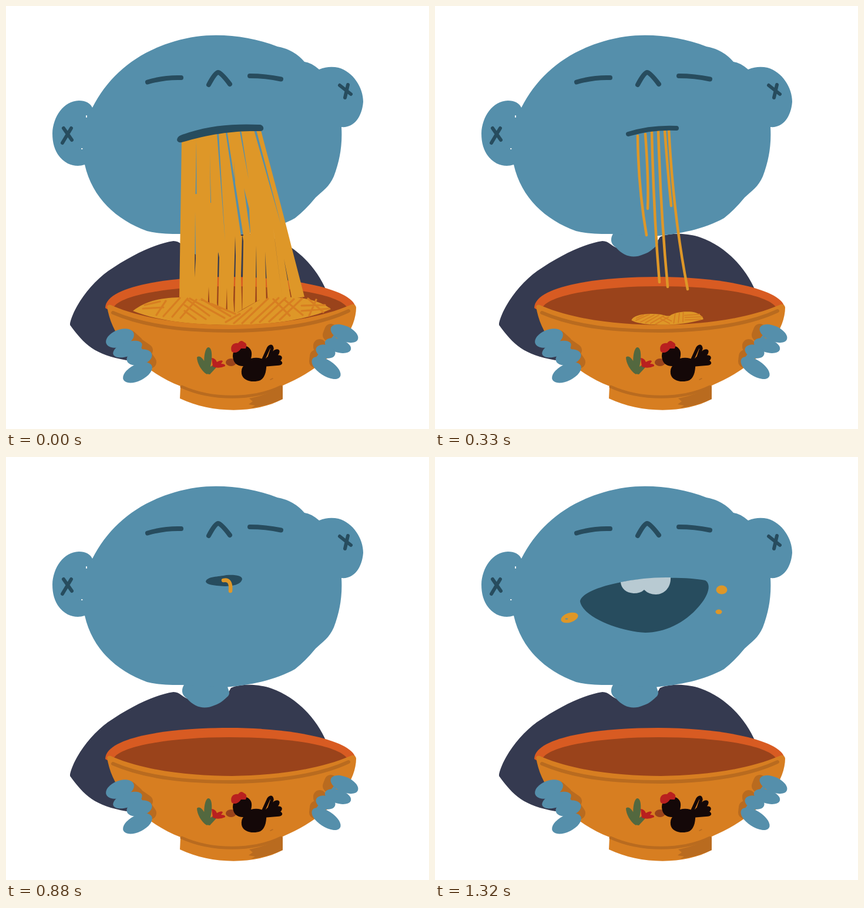
An HTML page without scripts that plays this animation: 720 by 720 pixels, repeating every 1430 ms.

```html
<!DOCTYPE html>
<html lang="en">
<head>
<meta charset="utf-8">
<title>Noodle slurp</title>
<style>
  html, body { margin: 0; width: 100%; height: 100%; overflow: hidden; background: #fff; }
  svg { display: block; width: 100%; height: 100%; }
  path { stroke-linecap: round; stroke-linejoin: round; }
  .skin { fill: #558fab; }
  .ink { fill: #274c5e; }
  .line { fill: none; stroke: #274c5e; }
  .noodle { fill: #de9728; }
  .strand { fill: none; stroke: #de9728; stroke-width: 4.5; }
  .thick { stroke-width: 6.5; }
  .crease { fill: none; stroke: #d77e21; stroke-width: 3.2; }
  .bowl { fill: #d77e21; }
  .shade { fill: #b96b1f; }
  .band { fill: none; stroke: #b96b1f; }
  .hen { fill: #140808; }
  .feather { fill: none; stroke: #140808; stroke-width: 5.5; }
  .red { fill: #b9201f; }
  /* each pose owns one 110 ms slot of the 13-slot loop */
  .pose { visibility: hidden; animation: show 1430ms step-end infinite; animation-delay: calc(var(--i) * 110ms - 1430ms); }
  @keyframes show {
    0% { visibility: visible; }
    7.6923% { visibility: hidden; }
    100% { visibility: hidden; }
  }
</style>
</head>
<body>
<svg viewBox="0 0 720 720">
  <defs>
    <mask id="gaps" maskUnits="userSpaceOnUse" x="0" y="0" width="720" height="720">
      <path fill="#fff" d="M0 0H720V720H0Z"/>
      <path d="M324 228L324.500 320H322.500ZM322 350L323 430 321 462ZM347 250L349 335H348ZM359 216L362 216 368 320 373 400ZM374 215L376.500 215 404 391H400ZM398 214L400.500 214 413 295ZM422 211L426 211 441 268 468 372ZM405 310L414 345 416 390ZM388 262L390 300H389Z"/>
      <path d="M361 418L363 428 361 520 359 505ZM376 480L377 530H374ZM390 392L391 425 389 530 387 500ZM402 388L404 400 402 530 400 460ZM426 408L427 515H424ZM441 418L446 510H443ZM455 378L459 410 472 510ZM345 478L347 520H343ZM473 430L488 505H486Z"/>
    </mask>

    <path id="mouthWide" class="ink" d="M291 228C292 219 302 219 312 215C350 203 390 200 433 202C440 204 440 213 433 213C390 212 350 217 299 232Q292 233 291 228Z"/>
    <path id="mouthLine" class="line" stroke-width="8" d="M308 222Q366 205 424 208"/>
    <path id="mouthOval" class="ink" d="M340 212C342 203 362 204 375 201C391 200 402 202 402 208C400 217 386 220 372 220C352 219 341 217 340 212Z"/>
    <path id="mouthSmall" class="ink" d="M354 210Q370 196 386 210Q370 224 354 210Z"/>
    <g id="laugh">
      <path class="ink" d="M247 246C247 236 270 222 317 213C360 204 430 204 460 210C470 216 466 232 455 247C430 281 392 299 358 299C315 297 252 273 247 246Z"/>
      <path fill="#b8cad2" d="M316 213Q360 204 401 205C402 222 390 234 376 234Q364 234 356 226Q350 232 338 232C325 231 317 224 316 213Z"/>
    </g>
    <g id="crumbs" class="noodle">
      <ellipse cx="229" cy="273.500" rx="15" ry="8" transform="rotate(-17 229 273.500)"/>
      <ellipse class="skin" cx="224" cy="275.500" rx="2.500" ry="1"/>
      <ellipse cx="488" cy="226" rx="9.500" ry="7.500"/>
      <ellipse cx="483" cy="263.500" rx="5.500" ry="4"/>
    </g>
    <g id="smallPile">
      <path class="noodle" d="M294 530C298 516 330 510 360 512C380 511 394 520 403 517C415 508 440 504 465 506C485 509 497 519 498 527C460 538 420 543 385 543C350 543 310 540 294 530Z"/>
      <path class="crease" d="M308 524L328 515M307 530L345 513M320 535L358 515M334 537L372 515M348 539L386 517M362 541L399 521M382 519L407 532M377 526L402 539M418 511L414 538M430 509L427 536M441 508L440 534M445 516L487 513M446 522L494 520M446 529L490 527"/>
    </g>
  </defs>

  <path fill="#353a50" d="M109 540C115 513 142 474 174 451C212 425 252 405 285 400C297 400 300 410 312 412L372 412L383 393C402 385 432 387 452 394C497 410 530 448 545 484L400 570L205 603C150 593 134 577 109 543Z"/>
  <path class="skin" d="M304 386C298 395 298 405 308 411C322 427 338 430 354 423C367 419 373 411 378 407C383 400 377 396 377 389Z"/>
  <path class="skin" d="M147 173C180 108 240 65 324 52C370 46 420 53 462 69Q490 74 508 95Q519 96 533 108C545 103 556 103 566 105C591 112 608 139 608 163C606 190 591 208 571 206C573 240 567 266 558 290C550 308 540 314 527 326Q510 347 492 361C458 380 417 388 372 392L303 388C280 388 260 388 240 383C188 364 147 327 134 270Q120 275 105 268C87 258 79 240 79 217C80 188 98 162 124 161Q141 161 147 173Z"/>
  <path fill="none" stroke="#fff" stroke-width="2" d="M137 187v2M129 243h.5"/>
  <path class="line" stroke-width="8" d="M241 129.500Q270 121 298 122M415 119Q442 119 468 124.500M345 134Q356 113 361 113Q366 113 381 133"/>
  <path class="line" stroke-width="6" d="M98 208L112 228M111 208L96 233M568 135L587 150M582 134L577 156"/>

  <path fill="#d85b22" d="M169 514C169 478 270 461 380 461C490 461 593 483 595 514L560 540H210Z"/>
  <path fill="#9a431b" d="M183 513C195 492 280 477 380 477C480 477 562 490 580 512L540 540L385 550L230 540Z"/>

  <g class="pose" style="--i:0">
    <path class="noodle" mask="url(#gaps)" d="M299 227Q366 203 433 208C449 270 470 345 486 410L508 495L470 501 432 500 405 515 392 523 360 512 340 502 295 496Z"/>
    <path class="noodle" d="M216 519C240 500 270 496 300 496C330 498 350 506 364 515L394 522L432 500C470 492 525 493 553 516C500 539 430 543 385 543C320 543 260 537 216 519Z"/>
    <path class="crease" d="M233 515L268 513M236 509L262 503M256 526L272 502M268 528L296 497M283 529L309 498M297 531L324 500M309 500L346 527M304 509L340 533M304 519L323 533M313 498L372 531M333 499L382 528M350 507L390 524M374 538L398 524M388 540L418 514M402 540L446 498M417 540L464 497M432 538L476 497M448 537L490 499M466 534L504 498M455 499L483 527M474 500L505 526M514 498L540 521M503 510L543 509M503 519L550 515M516 527L528 500"/>
    <use href="#mouthWide"/>
  </g>

  <g class="pose" style="--i:1">
    <path class="noodle" mask="url(#gaps)" d="M299 227Q366 203 433 208C449 270 470 345 486 410L492 432 480 426 470 446 457 428 444 450 430 430 415 455 400 435 389 456 376 436 366 452 358 430 350 462 334 440 321 450 310 455 293 452Z"/>
    <path class="strand thick" d="M297 420Q295 465 281 498M306 420Q304 465 292 497M317 420Q315 460 303 498M330 420Q328 465 315 501M338 420Q336 460 328 503M346 420L341 505M354 420L357 505M371 420L363 506M377 420L376 510M385 420L386 512M394 420L396 512M401 420L407 510M411 420L419 510M420 420L431 510M430 420L443 510M440 420L455 510M450 420L468 510M460 420L481 512M470 420L495 514M480 420L508 516M487 415L519 523"/>
    <path class="noodle" d="M295 420L322 415 319 448 305 455 293 452ZM327 415L360 415 359 448 345 462 329 450Z"/>
    <path class="noodle" d="M235 521C240 506 280 495 310 497C340 499 352 506 366 512C390 502 430 500 470 507C500 511 523 517 521 527C480 540 430 543 385 543C330 543 255 537 235 521Z"/>
    <path class="crease" d="M254 527Q268 505 296 500M267 530Q282 508 310 502M283 532Q296 511 322 505M299 533Q312 514 336 508M315 537Q326 519 348 511M332 538Q340 522 358 514M302 501Q338 507 355 538M325 501Q357 512 370 540M370 514Q389 520 398 540M384 510Q404 518 412 538M400 508Q419 515 428 537M388 539Q405 514 436 508M417 537Q432 514 462 509M433 536Q449 517 480 512M450 533Q468 518 498 517M440 510Q460 528 484 531M465 511Q484 524 514 525"/>
    <use href="#mouthWide"/>
  </g>

  <g class="pose" style="--i:2">
    <use href="#smallPile"/>
    <path class="strand" d="M322 228Q330 340 345 495M329 228Q333 270 339 278M323 232Q333 340 343 455M340 230Q340 370 363 509M348 224L348 336Q352 400 357 490M348 254Q357 410 357 490M356 220Q363 350 376 498M370 214Q366 280 371 313M369 226Q374 380 379 470M378 211L379 472M386 211Q388 370 396 478M398 212Q402 350 410 468M410 212Q424 280 429 299M402 228Q412 300 422 327M407 282Q423 400 435 490M410 212Q430 380 453 492"/>
    <use href="#mouthLine"/>
  </g>

  <g class="pose" style="--i:3">
    <use href="#smallPile" transform="translate(158 217) scale(.6)"/>
    <path class="strand" d="M345 221Q346 310 360 390M358 218Q364 300 362 345M369 213Q372 350 382 470M380 211Q384 350 396 478M391 211Q396 280 402 340M398 211Q406 360 430 482"/>
    <path class="line" stroke-width="8" d="M329 218Q368 206 411 208"/>
  </g>

  <g class="pose" style="--i:4">
    <use href="#mouthOval"/>
    <path class="strand" d="M362 213Q376 208 374 226C376 260 361 302 378 327M389 211Q402 212 401 235L402 344"/>
    <path class="strand thick" d="M372 210Q388 204 389 232C391 270 380 303 395 345"/>
    <path class="strand" d="M395 345C402 390 414 435 431 462"/>
  </g>

  <g class="pose" style="--i:5">
    <use href="#mouthOval"/>
    <path class="strand" d="M389 211Q401 212 399 235L400 278"/>
    <path class="strand thick" d="M370 210Q387 205 386 230C385 270 377 310 410 360"/>
  </g>

  <g class="pose" style="--i:6">
    <use href="#mouthOval"/>
    <path class="strand thick" d="M369 210Q386 205 382 226C377 248 379 266 397 276"/>
  </g>

  <g class="pose" style="--i:7">
    <use href="#mouthOval"/>
    <path class="strand thick" d="M369 210Q385 206 382 224Q378 240 388 252"/>
  </g>

  <g class="pose" style="--i:8">
    <use href="#mouthOval"/>
    <path class="strand thick" d="M370 210Q384 207 382 228"/>
  </g>

  <g class="pose" style="--i:9"><use href="#mouthSmall"/><use href="#crumbs"/></g>
  <g class="pose" style="--i:10"><use href="#mouthSmall"/><use href="#crumbs"/></g>
  <g class="pose" style="--i:11"><use href="#laugh" transform="translate(146 84) scale(.6)"/><use href="#crumbs"/></g>
  <g class="pose" style="--i:12"><use href="#laugh"/><use href="#crumbs"/></g>

  <path class="bowl" d="M172 511Q175 506 183 511C240 535 320 543 385 543C455 542 530 533 586 509Q594 505 596 513C596 555 555 610 471 646V669C425 694 350 694 296 668L297 647C235 623 180 570 172 511Z"/>
  <path class="band" stroke-width="6" d="M182 522C240 547 310 553 385 553C460 552 530 544 583 519"/>
  <path class="band" stroke-width="5" d="M299 648C350 671 420 671 468 648"/>
  <path class="shade" d="M414 668Q445 662 471 647V669Q445 681 417 684L424 680 413 678 420 673Z"/>
  <path class="band" stroke-width="1.500" d="M450 636l4-2"/>

  <path fill="#53683f" d="M341 626C334 607 338 582 344 581C351 580 352 598 348 614L357 608Q361 611 358 615L347 627ZM342 627C332 621 325 607 325 598Q329 594 335 601Q342 610 345 622Z"/>
  <path class="red" d="M350 599Q357 600 359 606Q368 601 369 605L366 609Q374 609 373 613Q362 618 352 614Z"/>
  <ellipse cx="383" cy="606.500" rx="9" ry="6.500" fill="#9a431b"/>
  <path class="hen" d="M386 596C386 584 395 579 406 578C418 581 420 590 417 600Q430 596 443 604C444 618 442 632 433 637C420 642 403 638 401 626Q400 617 404 613Q387 613 386 596Z"/>
  <path class="feather" d="M437 604L447 582Q452 576 453 583L446 604M440 606L458 588Q465 585 462 591L446 607M441 608L463 597Q470 597 465 602L444 609M441 610L464 605Q471 608 464 609L440 611"/>
  <path class="red" d="M384 588C381 578 387 573 395 574Q400 567 405 572Q412 575 408 583L400 583Q395 591 387 590Z"/>

  <path class="band" stroke-width="22" d="M211 563L222 573M226 577L239 586M238 596L245 606M553 552L550 560M534 578L534 580M528 596L527 605"/>
  <path class="skin" d="M204 572L226 574 242 602 228 618 212 600ZM558 560L570 576 550 594 534 612 526 600Z"/>
  <g class="skin">
    <ellipse rx="25" ry="14.500" transform="translate(194 565.500) rotate(-21)"/>
    <ellipse rx="26" ry="12" transform="translate(207 584) rotate(-20)"/>
    <ellipse rx="22" ry="13" transform="translate(227 598) rotate(-14)"/>
    <ellipse rx="27" ry="14" transform="translate(224 624) rotate(-27)"/>
    <ellipse rx="25" ry="13" transform="translate(576 557.500) rotate(24)"/>
    <ellipse rx="23" ry="11.500" transform="translate(565 578) rotate(17)"/>
    <ellipse rx="17" ry="11" transform="translate(544 588) rotate(18)"/>
    <ellipse rx="28" ry="13.500" transform="translate(545 616) rotate(33)"/>
  </g>
</svg>
</body>
</html>
```
